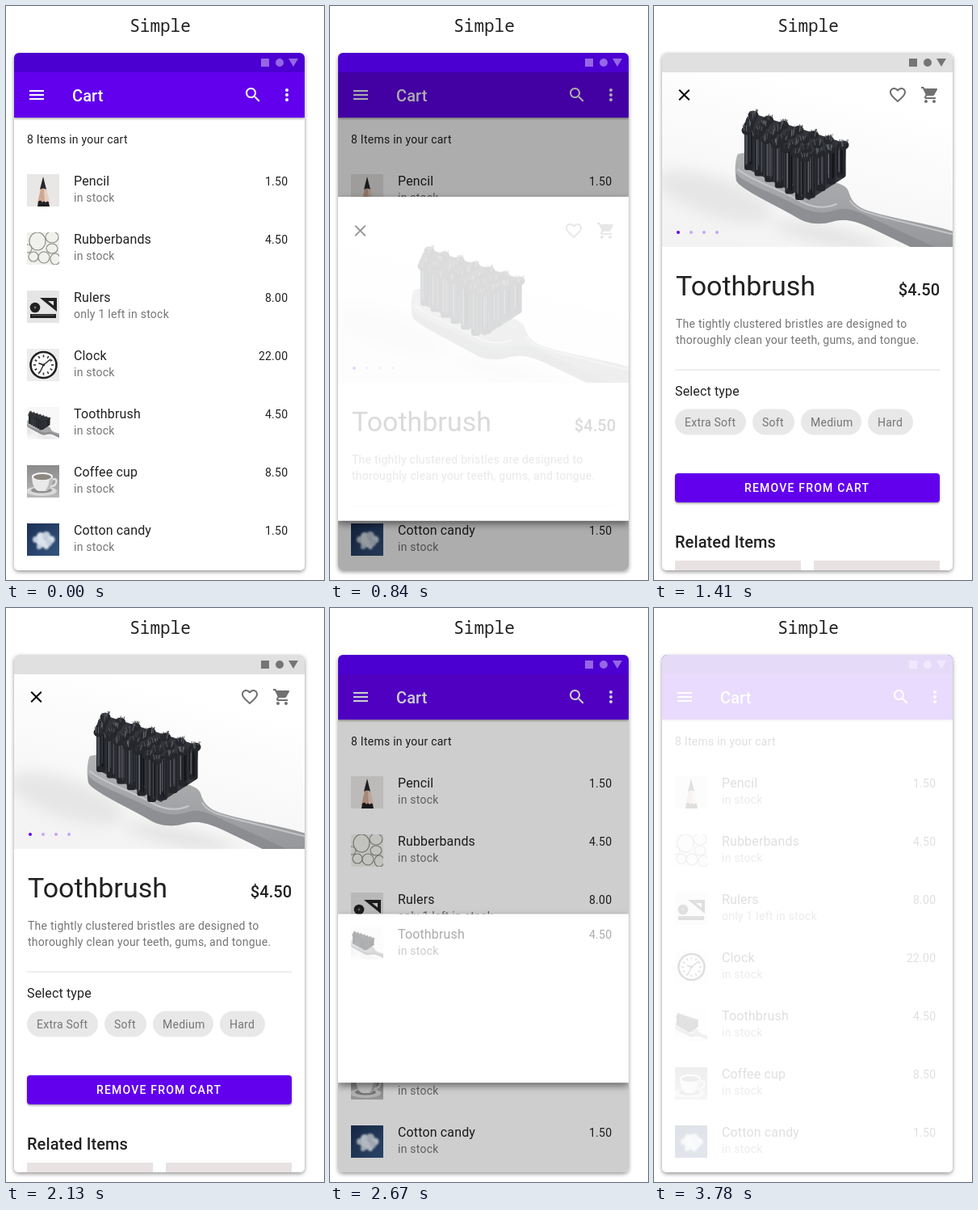
These frames come from a looping animation (394x710 px, 8 s). An HTML page:

```html
<!DOCTYPE html>
<html lang="en">
<head>
<meta charset="utf-8">
<title>Cart to detail</title>
<style>
html, body { margin: 0; width: 100%; height: 100%; overflow: hidden; background: #fff; }
svg { display: block; }
#stage { width: 394px; height: 710px; }
text { font-family: Roboto, sans-serif; font-size: 14px; letter-spacing: .25px; fill: #212121; }
.mono { font-family: "Roboto Mono", "Noto Sans Mono", monospace; font-size: 21px; letter-spacing: 0; }
.mid { font-size: 16px; letter-spacing: .15px; }
.bold { font-size: 20px; font-weight: 500; letter-spacing: .1px; }
.big { font-size: 34px; letter-spacing: 0; }
.dim { fill: #757575; }
.end { text-anchor: end; }
.btn { font-weight: 500; letter-spacing: 1.2px; fill: #fff; }
.white { fill: #fff; }
</style>
</head>
<body>
<svg id="stage" viewBox="0 0 394 710"></svg>
<script>
const LOOP = 8000, STEP = 30;
const ROW = { top: 480, bottom: 552 }, PHONE = { top: 58, bottom: 698 };
const stage = document.getElementById('stage');
const $ = id => document.getElementById(id);
const clamp = (v, a = 0, b = 1) => Math.min(b, Math.max(a, v));
const ramp = (t, a, b) => clamp((t - a) / (b - a));
const mix = (a, b, k) => a + (b - a) * k;
const times = (n, fn) => Array.from({ length: n }, (_, i) => fn(i)).join('');

let seed = 7;
const rnd = (a, b) => {
  seed = (seed * 16807) % 2147483647;
  return a + (b - a) * seed / 2147483647;
};

const rect = (x, y, w, h, fill, more = '') =>
  `<rect x="${x}" y="${y}" width="${w}" height="${h}" fill="${fill}" ${more}/>`;
const circle = (x, y, r, fill, more = '') =>
  `<circle cx="${x}" cy="${y}" r="${r}" fill="${fill}" ${more}/>`;
const ellipse = (x, y, rx, ry, fill, more = '') =>
  `<ellipse cx="${x}" cy="${y}" rx="${rx}" ry="${ry}" fill="${fill}" ${more}/>`;
const path = (d, fill, more = '') => `<path d="${d}" fill="${fill}" ${more}/>`;
const line = (d, color, w) => path(d, 'none', `stroke="${color}" stroke-width="${w}" stroke-linecap="round"`);
const text = (x, y, s, cls = '') => `<text x="${x}" y="${y}" class="${cls}">${s}</text>`;
const icon = (x, y, d, fill) => path(d, fill, `transform="translate(${x} ${y})"`);

const ICON = {
  menu: 'M3 6h18v2H3zM3 11h18v2H3zM3 16h18v2H3z',
  search: 'M15.5 14h-.79l-.28-.27C15.41 12.59 16 11.11 16 9.5 16 5.91 13.09 3 9.5 3S3 5.91 3 9.5 5.91 16 9.5 16c1.61 0 3.09-.59 4.23-1.57l.27.28v.79l5 4.99L20.49 19zm-6 0C7.01 14 5 11.99 5 9.5S7.01 5 9.5 5 14 7.01 14 9.5 11.99 14 9.5 14z',
  close: 'M19 6.41L17.59 5 12 10.59 6.41 5 5 6.41 10.59 12 5 17.59 6.41 19 12 13.41 17.59 19 19 17.59 13.41 12z',
  heart: 'M16.5 3c-1.74 0-3.41.81-4.5 2.09C10.91 3.81 9.24 3 7.5 3 4.42 3 2 5.42 2 8.5c0 3.78 3.4 6.86 8.55 11.54L12 21.35l1.45-1.32C18.6 15.36 22 12.28 22 8.5 22 5.42 19.58 3 16.5 3zm-4.4 15.55l-.1.1-.1-.1C7.14 14.24 4 11.39 4 8.5 4 6.5 5.5 5 7.5 5c1.54 0 3.04.99 3.57 2.36h1.87C13.46 5.99 14.96 5 16.5 5c2 0 3.5 1.5 3.5 3.5 0 2.89-3.14 5.74-7.9 10.05z',
  cart: 'M7 18c-1.1 0-2 .9-2 2s.9 2 2 2 2-.9 2-2-.9-2-2-2zM1 2v2h2l3.6 7.59-1.35 2.45C4.52 15.37 5.48 17 7 17h12v-2H7.42c-.14 0-.25-.11-.25-.25l.03-.12.9-1.63h7.45c.75 0 1.41-.41 1.75-1.03l3.58-6.49A1 1 0 0 0 20 4H5.21l-.94-2zm16 16c-1.1 0-2 .9-2 2s.9 2 2 2 2-.9 2-2-.9-2-2-2z'
};

// Bristle block: front and side tufts hang below a bilinear top face.
function tuft(x, top, bottom, w) {
  const hair = times(5, () => {
    const dx = rnd(1.5, w - 1.5);
    return line(`M${x + dx} ${top + rnd(3, 9)}V${bottom - rnd(4, 14)}`, rnd(0, 1) < .6 ? '#4d5056' : '#0f1013', .9);
  });
  return rect(x, top, w, bottom - top, '#23252a', 'rx="3"') + hair +
    line(`M${x + 3} ${top + 8}V${bottom - 8}`, '#6f7278', 1);
}

function bristles() {
  const front = times(6, i => tuft(112 + i * 12.6, 150 + i * 6, 203 + i * 7.4, 11.2));
  const side = times(4, i => tuft(226 - i * 12.6, 171 + i * 4, 212 + i * 8.5, 11.6));
  const face = (u, v) => [
    mix(mix(115, 187, u), mix(123, 235, u), v),
    mix(mix(151, 185, u), mix(132, 169, u), v)
  ];
  const top = times(4, j => times(7, i => {
    const [x, y] = face(i / 6, 1 - j / 3);
    return ellipse(x, y + 3, 6.5, 5.5, '#25272b') + times(9, () => {
      const a = rnd(-5.5, 5.5);
      return line(`M${x + a * .7} ${y + rnd(0, 5)}L${x + a} ${y - rnd(1, 4.5)}`, rnd(0, 1) < .4 ? '#73767b' : '#303237', .8);
    });
  }));
  return path('M113 152L123 133L238 170L236 212L192 240L113 200Z', '#33353a') + side + front + top;
}

const brush =
  ellipse(75, 236, 75, 24, '#e6e6e6', 'filter="url(#soft)" transform="rotate(18 75 236)"') +
  ellipse(215, 284, 70, 10, '#e2e2e2', 'filter="url(#soft)" transform="rotate(12 215 284)"') +
  path('M104 183C100 190 100 210 102 216C106 226 150 246 176 261C190 270 206 271 220 267C238 262 250 266 272 276L322 300H372V279C340 269 300 264 268 254C250 249 244 240 241 229C238 221 225 218 210 214L120 180Z', 'url(#body)') +
  path('M102 206C106 218 150 232 178 247C196 256 210 258 226 252C244 247 258 258 280 267L352 300H322L272 276C250 266 238 262 220 267C206 271 190 270 176 261C150 246 106 226 102 216Z', '#85868a', 'opacity=".65"') +
  line('M104 202C120 216 160 228 182 242C198 250 212 251 226 245', '#c6c7c9', 2) +
  line('M243 241C250 252 262 255 284 261L369 282', '#c3c4c6', 2) + bristles();

const thumbs = [
  rect(0, 0, 40, 40, '#e9e7e5') + path('M20 4L13 36H28Z', '#cfa892') + path('M21 18L22 36H28L24 18Z', '#e6cfc0') +
    path('M20 3L16 19Q20 16 24 19Z', '#26262a') + path('M13 40L14 34Q17 31 19 35Q21 32 23 35Q26 32 27 35L28 40Z', '#1f1f22'),
  rect(0, 0, 40, 40, '#f0f0ec') + [[13, 11, 10, 11], [31, 6, 8, 7], [31, 20, 7, 6], [8, 30, 6, 6], [21, 31, 7, 7], [35, 33, 6, 7], [1, 20, 5, 5]]
    .map(([x, y, a, b]) => ellipse(x, y, a, b, 'none', 'stroke="#8c8c88" stroke-width="1.1"')).join(''),
  rect(0, 0, 40, 40, '#e5e5e5') + path('M16 9H37V26ZM26 13L33 18.5V13Z', '#222', 'fill-rule="evenodd"') +
    circle(10, 21, 6.3, '#222') + circle(10, 21, 1.4, '#777') + rect(4, 29, 32, 5, '#222') + rect(6, 30, 28, 1, '#555'),
  rect(0, 0, 40, 40, '#ececec') + circle(20.5, 20, 16, '#fbfbfb', 'stroke="#202020" stroke-width="2.6"') +
    times(12, i => `<g transform="rotate(${i * 30} 20.5 20)">${rect(19.7, 7.5, 1.6, 3, '#333')}</g>`) +
    line('M16 29L20.5 20L29 13', '#222', 1.3) + line('M20.5 20L15 18', '#222', 1.6) + circle(20.5, 20, 1.5, '#222'),
  rect(0, 0, 40, 40, '#f8f8f8') + '<use href="#brush" transform="translate(-21.5 -22) scale(.21)"/>',
  rect(0, 0, 40, 40, 'url(#grey)') + ellipse(18, 32, 19, 6, '#d9d9d9') + ellipse(18, 31, 13, 3.5, '#8f8f8f') +
    line('M30 18Q38 15 36 22Q34 27 28 26', '#e4e4e4', 2.2) + path('M6 14Q7 31 15 32H23Q31 30 32 14Z', '#e9e9e9') +
    path('M22 32Q31 30 32 14H28Q28 26 22 32Z', '#bcbcbc') + ellipse(19, 14, 13, 5, '#f7f7f7') + ellipse(19, 14.6, 11, 3.7, '#8d8880'),
  rect(0, 0, 40, 40, 'url(#night)') + '<g filter="url(#puff)">' +
    [[11, 20, 4], [17, 16, 5], [24, 15, 5], [30, 20, 4.5], [26, 24, 5], [18, 24, 6], [15, 29, 3], [24, 29, 3]]
      .map(([x, y, r], i) => circle(x, y, r, i % 2 ? '#dbe3ec' : '#c3cfdd')).join('') + '</g>'
];

const items = [['Pencil', '1.50'], ['Rubberbands', '4.50'], ['Rulers', '8.00'], ['Clock', '22.00'],
  ['Toothbrush', '4.50'], ['Coffee cup', '8.50'], ['Cotton candy', '1.50']];

function row(i) {
  const y = 192 + i * 72, [name, price] = items[i];
  return `<svg x="26" y="${y + 16}" width="40" height="40">${thumbs[i]}</svg>` +
    text(84, y + 30, name, 'mid') +
    text(84, y + 50, i === 2 ? 'only 1 left in stock' : 'in stock', 'dim') +
    text(349.3, y + 30, price, 'end');
}

const chips = [[26, 88, 'Extra Soft'], [122, 52, 'Soft'], [182, 75, 'Medium'], [265, 56, 'Hard']]
  .map(([x, w, s]) => rect(x, 498.5, w, 32, '#e8e8e8', 'rx="16"') + text(x + 12, 519.5, s, 'dim')).join('');

const detail =
  rect(10, 58, 360, 240, 'url(#paper)') + '<svg x="10" y="58" width="360" height="240" viewBox="10 58 360 240"><use href="#brush"/></svg>' +
  times(4, i => circle(30 + i * 16, 280, 2, i ? '#c5a5f8' : '#6200ee')) +
  icon(290, 98, ICON.heart, '#707070') + icon(330, 98, ICON.cart, '#707070') +
  text(27, 358, 'Toothbrush', 'big') + text(354.3, 358, '$4.50', 'bold end') +
  text(27, 398, 'The tightly clustered bristles are designed to', 'dim') +
  text(27, 418, 'thoroughly clean your teeth, gums, and tongue.', 'dim') +
  rect(26, 449.5, 328, 1, '#dedede') + text(26, 482, 'Select type', 'mid') + chips +
  rect(26, 578, 328, 36, '#6200ee', 'rx="4" filter="url(#low)"') + text(112, 601, 'REMOVE FROM CART', 'btn') +
  text(26, 670, 'Related Items', 'bold') + rect(26, 686, 156, 80, '#e8e2e2') + rect(198, 686, 156, 80, '#e8e2e2');

const shadow = (id, dy, blur, alpha) =>
  `<filter id="${id}" x="-20%" y="-20%" width="140%" height="150%"><feDropShadow dx="0" dy="${dy}" stdDeviation="${blur}" flood-opacity="${alpha}"/></filter>`;
const blur = (id, s) => `<filter id="${id}" x="-50%" y="-50%" width="200%" height="200%"><feGaussianBlur stdDeviation="${s}"/></filter>`;
const grad = (id, a, b, dir) => `<linearGradient id="${id}" ${dir}><stop stop-color="${a}"/><stop offset="1" stop-color="${b}"/></linearGradient>`;

stage.innerHTML = `<defs>
  ${shadow('base', 2, 2.4, .42)}${shadow('low', 1.5, 1.2, .35)}${shadow('high', 4, 5, .5)}
  ${blur('soft', 9)}${blur('puff', .9)}
  ${grad('body', '#b2b3b5', '#96979a', 'x1="0" y1="0" x2="0" y2="1"')}
  ${grad('paper', '#ffffff', '#f3f3f3', 'x1=".6" y1=".2" x2=".3" y2="1"')}
  ${grad('grey', '#8a8a8a', '#b9b9b9', 'x1="0" y1="0" x2="0" y2="1"')}
  ${grad('night', '#1b2f55', '#35557f', 'x1="0" y1="0" x2="1" y2="1"')}
  <clipPath id="phone">${rect(10, 58, 360, 640, '#000', 'rx="6"')}</clipPath>
  <clipPath id="cardClip">${rect(10, 480, 360, 72, '#000', 'id="cut"')}</clipPath>
  <g id="brush">${brush}</g>
</defs>
${rect(0, 0, 394, 710, '#fff')}
<text x="191" y="31.5" class="mono" text-anchor="middle">Simple</text>
${rect(10, 58, 360, 640, '#fff', 'rx="6" filter="url(#base)"')}
<g clip-path="url(#phone)">
  ${text(26, 170, '8 Items in your cart')}${times(7, row)}
  ${rect(10, 82, 360, 56, '#6200ee', 'filter="url(#low)"')}
  <g id="bar">${icon(26, 98, ICON.menu, '#fff')}${text(82, 118, 'Cart', 'bold white')}
  ${icon(294, 98, ICON.search, '#fff')}${times(3, i => circle(348, 104 + i * 6, 2, '#fff'))}</g>
  ${rect(10, 58, 360, 640, '#000', 'id="scrim"')}
  ${rect(10, 480, 360, 72, '#fff', 'id="lift" filter="url(#high)"')}
  <g clip-path="url(#cardClip)">
    ${rect(10, 58, 360, 640, '#fff')}
    <g id="rowCopy">${row(4)}</g>
    ${circle(190, 516, 0, '#000', 'id="tapRow"')}
    ${circle(37, 110, 0, '#000', 'id="tapClose"')}
    <g id="page"><g id="detail">${detail}</g><g id="close">${icon(25.5, 98, ICON.close, '#000')}</g></g>
  </g>
  ${rect(10, 58, 360, 24, '#4b00d1', 'id="status"')}
  <g id="marks">${rect(316, 65, 10, 10, 'inherit')}${circle(339, 70, 5, 'inherit')}${path('M350 65H362L356 75Z', 'inherit')}</g>
  ${rect(10, 58, 360, 640, '#fff', 'id="veil"')}
</g>`;

// Standard easing, cubic-bezier(.4, 0, .2, 1)
function ease(x) {
  if (x <= 0 || x >= 1) return clamp(x);
  let lo = 0, hi = 1;
  for (let i = 0; i < 24; i++) {
    const s = (lo + hi) / 2, r = 1 - s;
    if (1.2 * s * r * r + .6 * s * s * r + s ** 3 < x) lo = s; else hi = s;
  }
  return 3 * lo * lo - 2 * lo ** 3;
}

function set(id, attrs) {
  for (const k in attrs) $(id).setAttribute(k, attrs[k]);
}
const rgb = (a, b, k) => `rgb(${a.map((v, i) => Math.round(mix(v, b[i], k)))})`;

function draw(t) {
  const x = ramp(t, 497, 1392), z = ramp(t, 2260, 3100);
  const closing = t >= 2100;
  const open = closing ? 1 - ease(z) : ease(x);
  const show = closing ? 1 - ramp(z, 0, .25) : ramp(x, .3, .8);
  const rowShow = closing ? ramp(z, .3, .8) : 1 - ramp(x, 0, .25);
  const dark = closing ? 1 - ramp(z, .25, .85) : ramp(x, 0, .3);
  const lift = closing ? 1 - ramp(z, .7, .97) : ramp(x, 0, .2);
  const grey = closing ? 1 - ramp(t, 2240, 2385) : ramp(t, 1035, 1335);

  const y = mix(ROW.top, PHONE.top, open), height = mix(ROW.bottom, PHONE.bottom, open) - y;
  set('cut', { y, height });
  set('lift', { y, height, opacity: lift });
  set('scrim', { opacity: .32 * dark });
  set('rowCopy', { opacity: rowShow, transform: `translate(0 ${y - ROW.top})` });
  set('page', { transform: `translate(0 ${398 * (1 - open)})` });
  set('detail', { opacity: show });
  set('close', { opacity: Math.sqrt(show) });

  const press = ramp(t, 270, 560), tap = ramp(t, 2070, 2300);
  set('tapRow', {
    cy: 516 + y - ROW.top, r: press ? mix(8, 185, press) : 0,
    opacity: closing ? 0 : .1 * (1 - ramp(x, 0, .25))
  });
  set('tapClose', { r: tap ? mix(6, 23, tap) : 0, opacity: closing ? .1 * (1 - ramp(z, 0, .33)) : 0 });

  set('status', { fill: rgb([75, 0, 209], [224, 224, 224], grey) });
  set('marks', { fill: rgb([150, 102, 229], [117, 117, 117], grey) });
  set('veil', { opacity: .857 * ramp(t, 3540, 3780) });
}

const start = performance.now();
function tick(now) {
  const t = Math.max(0, now - start) % LOOP;
  draw(Math.floor(t / STEP) * STEP);
  requestAnimationFrame(tick);
}
draw(0);
requestAnimationFrame(tick);
</script>
</body>
</html>
```
